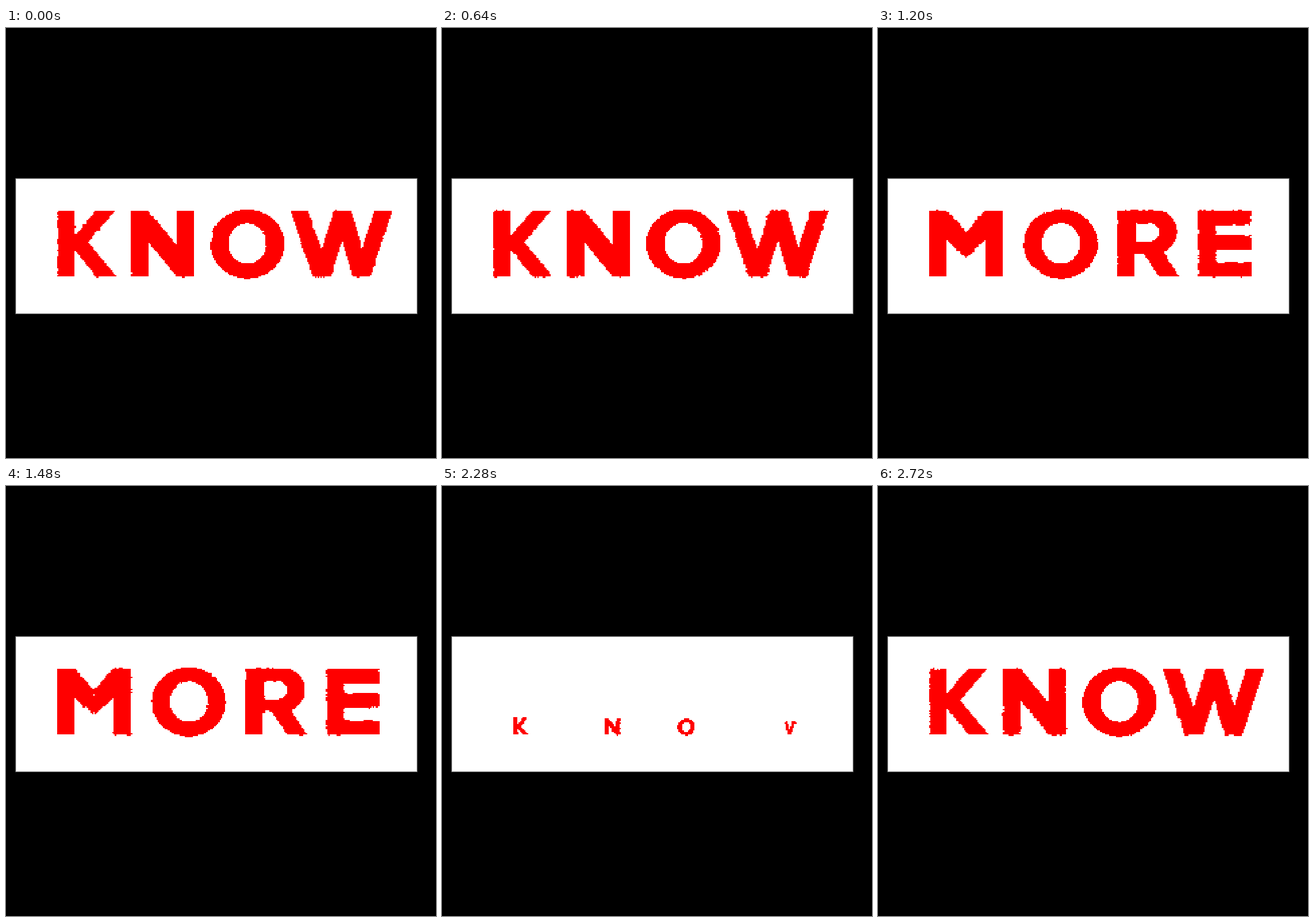
An HTML page with a canvas for the animation above (2.76 s loop, 748 by 748 pixels).

```html
<!DOCTYPE html>
<html lang="en">
<head>
<meta charset="utf-8">
<title>Know more</title>
<style>
html, body { margin: 0; width: 100%; height: 100%; overflow: hidden; background: #000; }
canvas { display: block; width: 748px; height: 748px; }
</style>
</head>
<body>
<canvas id="stage" width="748" height="748"></canvas>
<script>
const LOOP = 2760, TICK = 40, SIZE = 748, GRID = 320;
const BASE = 433, CAP = 115, STEM = 30, PEAK = 1.23;
const stage = document.getElementById('stage').getContext('2d');
const ink = document.createElement('canvas');
ink.width = ink.height = GRID;
const pen = ink.getContext('2d', { willReadFrequently: true });

const clamp = v => Math.max(0, Math.min(1, v));
const smooth = v => { v = clamp(v); return v * v * (3 - 2 * v); };
const hash = (a, b, c) => {
  const v = Math.sin(a * 12.9898 + b * 78.233 + c * 37.719) * 43758.5453;
  return v - Math.floor(v);
};

// Outlines in letter space: x from the left side, y from the cap line down.
const slant = (x0, y0, x1, y1, w) => [[x0, y0], [x0 + w, y0], [x1 + w, y1], [x1, y1]];
const bar = (x, y, w, h) => slant(x, y, x, y + h, w);
const stem = x => bar(x, 0, STEM, CAP);

function arc(cx, cy, rx, ry, from, to) {
  const count = 40;
  return Array.from({ length: count }, (_, i) => {
    const a = from + (to - from) * i / (count - 1);
    return [cx + rx * Math.cos(a), cy + ry * Math.sin(a)];
  });
}
const oval = (cx, cy, rx, ry) => arc(cx, cy, rx, ry, 0, Math.PI * 1.95);
const bowl = (x, cx, cy, rx, ry) =>
  [[x, cy - ry], ...arc(cx, cy, rx, ry, -Math.PI / 2, Math.PI / 2), [x, cy + ry]];

const zigzag = (xs, w) => xs.slice(1).map((x, i) =>
  i % 2 ? slant(x, 0, xs[i], CAP, w) : slant(xs[i], 0, x, CAP, w));
const wedge = (edge, dir) =>
  [[edge, 0], [edge + 32 * dir, 0], [64, 38], [64, 82], [edge, 22]];

// Each glyph is a list of pieces; a piece is an outline and perhaps its hole.
const solid = outlines => outlines.map(o => [o]);
const glyphs = {
  K: { width: 104, pieces: solid([stem(0), slant(67, 0, 20, 55, 33), slant(14, 50, 68, CAP, 35)]) },
  N: { width: 109, pieces: solid([stem(0), stem(79),
    [[0, 0], [STEM, 0], [109, CAP - 18], [109, CAP], [79, CAP], [0, 18]]]) },
  O: { width: 129, pieces: [[oval(64.5, 57.7, 64.5, 60.5), oval(64.5, 57, 33, 35.5)]] },
  W: { width: 177, pieces: solid(zigzag([0, 39, 75, 108, 146], 31)), torn: bar(-8, -8, 96, 140) },
  M: { width: 128, pieces: solid([stem(0), stem(98), wedge(0, 1), wedge(128, -1)]) },
  R: { width: 106, pieces: [[stem(0)], [slant(41, 68, 72, CAP, 35)],
    [bowl(12, 67, 36.5, 36, 37.5), bowl(32, 56, 37.5, 16, 15.5)]] },
  E: { width: 92, pieces: solid([stem(0), ...[0, 43, 90].map(y => bar(0, y, 91, 25))]),
    torn: bar(-8, -8, 110, 28) }
};

// drift and tilt bend a letter while its size is off
const letter = (char, x, enter, leave, drift = 0, tilt = 0) =>
  ({ ...glyphs[char], x, enter, leave, drift, tilt: tilt * Math.PI / 180 });
const letters = [
  letter('K', 90, 2246, 3392, -5),
  letter('N', 218, 2249, 3392, 24),
  letter('O', 355.5, 2249, 3392, 5),
  letter('W', 495, 2254, 3392, 14),
  letter('M', 89, 840, 1960),
  letter('O', 253.5, 892, 1925, -3, -8),
  letter('R', 417, 886, 1925, -20, -2),
  letter('E', 558, 896, 1925, 8, -9)
];

function scaleAt(t, enter, leave) {
  const a = t - enter, b = t - leave, extra = PEAK - 1;
  if (a <= 0) return 0;
  if (b > 80) return PEAK * (1 - smooth((b - 80) / 140));
  if (b > 0) return 1 + extra * smooth(b / 80);
  if (a < 160) return PEAK * a / 160;
  return 1 + extra * (1 - smooth((a - 160) / 160));
}

// Walks an outline in short steps, pushing some stretches off the line.
function trace(points, seed) {
  let k = 0;
  points.forEach(([x, y], i) => {
    const [nx, ny] = points[(i + 1) % points.length];
    const len = Math.hypot(nx - x, ny - y) || 1;
    const steps = Math.max(1, Math.round(len / 2.4));
    for (let j = 0; j < steps; j++, k++) {
      const reach = hash(k >> 3, seed, 5) > 0.82 ? 2.4 : 0.4;
      const d = reach * (hash(k, seed, 9) * 2 - 1);
      const px = x + (nx - x) * j / steps - (ny - y) / len * d;
      const py = y + (ny - y) * j / steps + (nx - x) / len * d;
      if (k) pen.lineTo(px, py); else pen.moveTo(px, py);
    }
  });
  pen.closePath();
}

function drawLetter({ pieces, width, torn, x, enter, leave, drift, tilt }, t, seed) {
  const time = enter > LOOP / 2 && t < LOOP / 2 ? t + LOOP : t;
  const s = scaleAt(time, enter, leave);
  if (s < 0.03) return;
  const entering = time < enter + 320;
  const early = entering ? clamp((1 - s) * 5) : 0;
  const late = time > leave ? clamp((s - 1) / (PEAK - 1)) : 0;
  const angle = tilt * (early + 0.25 * late);
  const cos = Math.cos(angle), sin = Math.sin(angle);
  const cx = x + width / 2 + drift * (early - 0.35 * late);
  const floor = BASE - Math.abs(sin) * s * width / 2;
  const place = ([px, py]) => {
    const dx = (px - width / 2) * s, dy = (py - CAP) * s;
    return [cx + dx * cos - dy * sin, floor + dx * sin + dy * cos];
  };
  const fill = (outlines, salt) => {
    pen.beginPath();
    outlines.forEach((o, i) => trace(o.map(place), seed + salt * 7 + i * 17));
    pen.fill('evenodd');
  };
  pieces.forEach(fill);
  if (torn && entering && s < 0.9) {
    pen.globalCompositeOperation = 'destination-out';
    fill([torn], 9);
    pen.globalCompositeOperation = 'source-over';
  }
}

function hardenEdges() {
  const image = pen.getImageData(0, 0, GRID, GRID), px = image.data;
  for (let i = 0; i < px.length; i += 4) {
    const on = px[i + 3] > 127 ? 255 : 0;
    px[i] = px[i + 3] = on;
    px[i + 1] = px[i + 2] = 0;
  }
  pen.putImageData(image, 0, 0);
}

function heldTime(t) {
  const tick = Math.floor(t / TICK) * TICK;
  if (tick < 200) return 0;
  return tick === 1040 || tick === 2040 ? tick - TICK : tick;
}

function drawPanel() {
  stage.fillStyle = '#000';
  stage.fillRect(0, 0, SIZE, SIZE);
  ['#444', '#ccc', '#fff'].forEach((shade, i) => {
    stage.fillStyle = shade;
    stage.fillRect(16 + i, 261 + i, 700 - 2 * i, 237 - 2 * i);
  });
}

function render(t) {
  pen.setTransform(1, 0, 0, 1, 0, 0);
  pen.clearRect(0, 0, GRID, GRID);
  pen.scale(GRID / SIZE, GRID / SIZE);
  pen.fillStyle = '#f00';
  letters.forEach((l, i) => drawLetter(l, t, t / TICK + i * 101));
  hardenEdges();
  drawPanel();
  stage.imageSmoothingEnabled = false;
  stage.drawImage(ink, 0, 0, SIZE, SIZE);
}

const start = performance.now();
let shown = -1;
function loop() {
  const t = heldTime((performance.now() - start) % LOOP);
  if (t !== shown) render(shown = t);
  requestAnimationFrame(loop);
}
loop();
</script>
</body>
</html>
```
